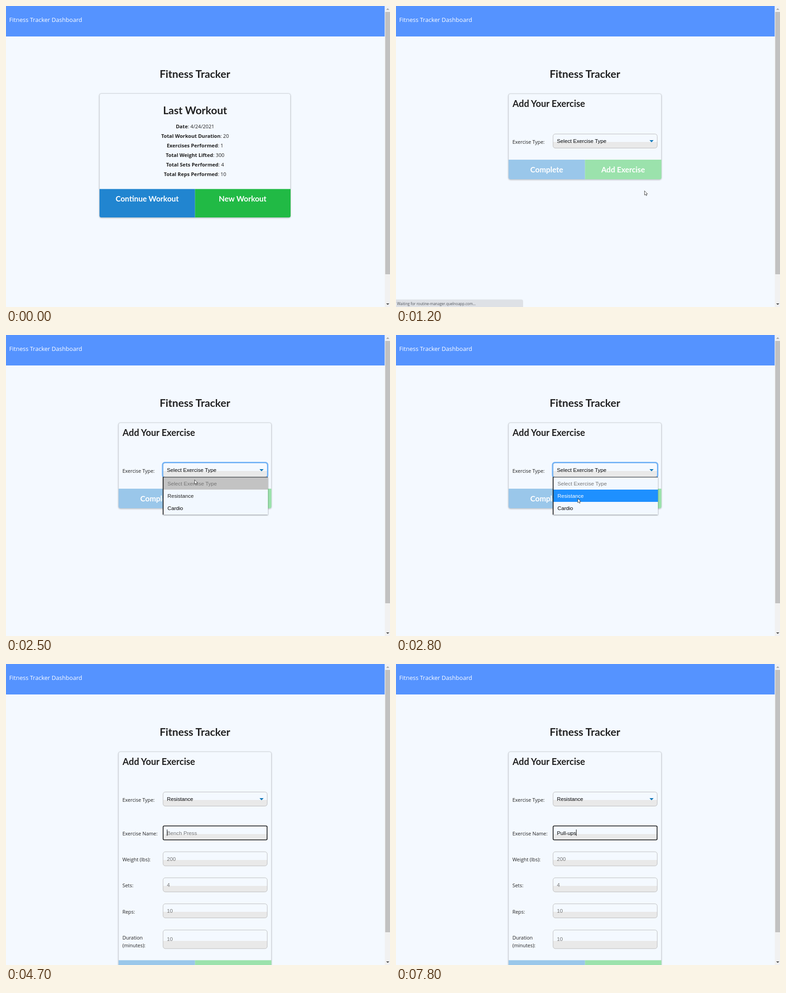
Animation, 846 px wide and 662 px high, one loop 8000 ms. Source, as an HTML page:

```html
<!DOCTYPE html>
<html lang="en">
<head>
<meta charset="utf-8">
<title>Fitness Tracker</title>
<style>
html, body { margin: 0; width: 100%; height: 100%; overflow: hidden; background: #f4f9ff; }
svg { display: block; width: 846px; height: 662px; }
text { font: 10.9px "Open Sans", "Noto Sans", sans-serif; fill: #212121; }
.mid { text-anchor: middle; }
.nav { font-size: 13.05px; fill: #fff; }
.row { font-size: 11.1px; }
.row tspan { font-weight: 700; }
.h1, .h2, .btn { font-family: Lato, sans-serif; font-weight: 700; }
.h1 { font-size: 23.4px; }
.h2 { font-size: 20.06px; }
.btn { font-size: 16.8px; fill: #fff; }
.val, .hint { font: 11.7px "Liberation Sans", Arial, sans-serif; fill: #000; }
.hint { fill: #757575; }
.status { font-size: 8.03px; fill: #50545a; }
.card { fill: #f4f9ff; stroke: #d0d5da; filter: drop-shadow(0 1px 1.5px #0004); }
.field { fill: url(#half); stroke: #bcbcbc; }
.ring { fill: none; stroke: #74b3f6; stroke-width: 3; }
</style>
</head>
<body>
<svg id="stage" viewBox="0 0 846 662"></svg>
<script>
const LOOP = 8000;
const stage = document.getElementById("stage");

const text = (x, y, str, cls = "") => `<text x="${x}" y="${y}" class="${cls}">${str}</text>`;
const rect = (x, y, w, h, fill, more = "") =>
  `<rect x="${x}" y="${y}" width="${w}" height="${h}" fill="${fill}" ${more}/>`;
const shape = (cls, x, y, w, h, r) => rect(x, y, w, h, "none", `class="${cls}" rx="${r}"`);
const group = (id, ...parts) => `<g id="${id}">${parts.join("")}</g>`;
const field = (y, h = 31) => shape("field", 346, y, 229.5, h, 5);

// Two buttons with rounded outer bottom corners
const half = (x, y, w, h, side, fill, id) => {
  const d = side < 0
    ? `M${x} ${y}h${w}v${h}h${4 - w}q-4 0 -4 -4z`
    : `M${x} ${y}h${w}v${h - 4}q0 4 -4 4h${4 - w}z`;
  return `<path id="${id}" d="${d}" fill="${fill}"/>`;
};
const buttons = (id, x, y, w, h, blue, green) =>
  half(x, y, w, h, -1, blue, id + "Left") + half(x + w, y, w, h, 1, green, id + "Right");

const stats = [["Date", "4/24/2021"], ["Total Workout Duration", 20], ["Exercises Performed", 1],
  ["Total Weight Lifted", 300], ["Total Sets Performed", 4], ["Total Reps Performed", 10]];
const inputs = [["Weight (lbs):", 200], ["Sets:", 4], ["Reps:", 10]];
const paleBlue = "#9ac7ea", paleGreen = "#9be2ac";

stage.innerHTML = `<defs><linearGradient id="half" x2="0" y2="1">
    <stop offset=".58" stop-color="#f4f9ff"/><stop offset=".58" stop-color="#e9e9e9"/>
  </linearGradient></defs>` +
  rect(0, 0, 846, 662, "#f4f9ff") +
  rect(0, 0, 834.5, 67, "#5593ff") +
  text(7, 34.5, "Fitness Tracker Dashboard", "nav") +
  text(416.2, 158, "Fitness Tracker", "h1 mid") +
  rect(834.5, 0, 11.5, 662, "#f1f1f1") +
  rect(835.5, 13, 10.5, 577, "#c1c1c1") +
  `<path d="M837.5 8.5h7l-3.5-3.5z" fill="#a3a3a3"/><path d="M837.5 654h7l-3.5 3.5z" fill="#505050"/>` +

  group("summary",
    shape("card", 206, 192.5, 420.5, 272.5, 4),
    text(416.5, 238, "Last Workout", "h1 mid"),
    ...stats.map(([name, value], i) =>
      text(416.5, 269.2 + 20.9 * i, `<tspan>${name}</tspan>: ${value}`, "row mid")),
    buttons("main", 206, 402.5, 210.5, 62.5, "#2185d0", "#21ba45"),
    text(311, 430, "Continue Workout", "btn mid"),
    text(521.3, 430, "New Workout", "btn mid")) +

  group("form",
    group("short",
      shape("card", 248, 193, 336.5, 188, 4),
      buttons("pale", 248, 338, 168.4, 43, paleBlue, paleGreen),
      text(332, 366, "Complete", "btn mid"),
      text(500.3, 366, "Add Exercise", "btn mid")),
    group("long",
      shape("card", 248, 193, 336.5, 502, 4),
      buttons("low", 248, 651.5, 168.4, 43, paleBlue, paleGreen),
      text(256.5, 377, "Exercise Name:"), field(356),
      shape("focus", 346.25, 356.25, 229, 30.5, 2),
      text(354.5, 375.5, "", "val name"),
      rect(0, 364, 1, 14, "#000", 'id="caret"'),
      ...inputs.map(([label, value], i) => {
        const y = 413 + 57.2 * i;
        return text(256.5, y + 21.2, label) + field(y) + text(354.5, y + 19.5, value, "hint");
      }),
      text(256.5, 606, "Duration"), text(256.5, 622.7, "(minutes):"),
      field(585, 41), text(354.5, 609, 10, "hint")),
    text(256.8, 221.7, "Add Your Exercise", "h2"),
    text(256.5, 303, "Exercise Type:"),
    field(281.5).replace("<rect", '<rect id="select"'),
    shape("ring", 345, 280.5, 231.5, 33, 5),
    text(354.5, 301, "", "val choice"),
    `<path d="M558.5 295h9l-4.5 4.8z" fill="#0b76b8"/>`) +

  group("menu",
    rect(346, 312.5, 231, 82.5, "#f2f8ff", 'style="filter:drop-shadow(0 1px 1.5px #0007)"'),
    rect(346, 313, 231, 27, "#c3c3c3", 'id="mark"'),
    rect(345.5, 312.2, 231.5, 1, "#222"), rect(345.5, 312.2, 1.6, 82.8, "#111"),
    text(355.7, 331, "Select Exercise Type", "hint"),
    text(355.7, 357.7, "Resistance", "val pick"),
    text(355.7, 384.6, "Cardio", "val")) +

  group("status",
    `<path d="M0 645.5h276q4 0 4 4v13H0z" fill="#dee1e6"/>`,
    text(2.3, 657.5, "Waiting for routine-manager.quelnoapp.com...", "status")) +

  `<path id="cursor" d="M.5 .5v9.4l2.2-2 1.5 3.3 1.5-.7-1.4-3.2h2.8z"
    fill="#fff" stroke="#222" stroke-width=".8"/>`;

const $ = sel => stage.querySelector(sel);
const show = (sel, on) => { $(sel).style.display = on ? "" : "none"; };
const paint = (sel, fill) => { $(sel).style.fill = fill; };

// Entries are [start ms, value...]; the latest one started holds
const at = (list, t) => list.filter(e => e[0] <= t).pop();

const moves = [[100, 279, 181], [200, 385, 315], [300, 490, 419], [400, 558, 350],
  [600, 566, 289], [700, 557, 355], [800, 547, 406],
  [1400, 517, 381], [1500, 472, 341], [1600, 435, 309], [1700, 419, 295],
  [2500, 415, 318], [2600, 410, 335], [2700, 404, 350], [2800, 400, 359]];
const typed = [[3800, ""], [4900, "P"], [5600, "Pu"], [6000, "Pul"], [6100, "Pull"],
  [6800, "Pull-"], [7500, "Pull-u"], [7700, "Pull-up"], [7800, "Pull-ups"]];
const blinks = [[0, 0], [3800, 1], [4300, 0], [4700, 1], [5400, 0], [5600, 1],
  [6600, 0], [6800, 1], [7100, 0], [7500, 1]];

function draw(t) {
  const between = (a, b) => t >= a && t < b;
  show("#summary", t < 1200);
  show("#form", t >= 1200);
  show("#short", t < 3200);
  show("#long", t >= 3200);
  show("#menu", between(2200, 3200));
  show("#status", between(700, 2200));
  show(".ring", between(2100, 3800));
  paint("#mainRight", t < 1100 ? "#21ba45" : "#0ea432");
  $("#select").style.stroke = between(1600, 2100) ? "#949494" : "";

  const onPick = t >= 2700;
  $("#mark").setAttribute("y", onPick ? 340 : 313);
  paint("#mark", onPick ? "#1e90ff" : "#c3c3c3");
  paint(".pick", onPick ? "#fff" : "#212121");
  $(".choice").textContent = t < 3200 ? "Select Exercise Type" : "Resistance";

  const focused = t >= 3800;
  const value = focused ? at(typed, t)[1] : "";
  const name = $(".name");
  const focus = $(".focus").style;
  focus.fill = "none";
  focus.stroke = focused ? "#111" : "none";
  focus.strokeWidth = 1.6;
  name.textContent = value || "Bench Press";
  paint(".name", value ? "#000" : "#757575");
  show("#caret", at(blinks, t)[1]);
  if (focused) $("#caret").setAttribute("x", 354.5 + (value ? name.getComputedTextLength() : 0));

  const spot = at(moves, t);
  show("#cursor", spot && t < 3200);
  if (spot) $("#cursor").setAttribute("transform", `translate(${spot[1]} ${spot[2]})`);
}

function tick() {
  draw(performance.now() % LOOP);
  requestAnimationFrame(tick);
}
tick();
</script>
</body>
</html>
```
